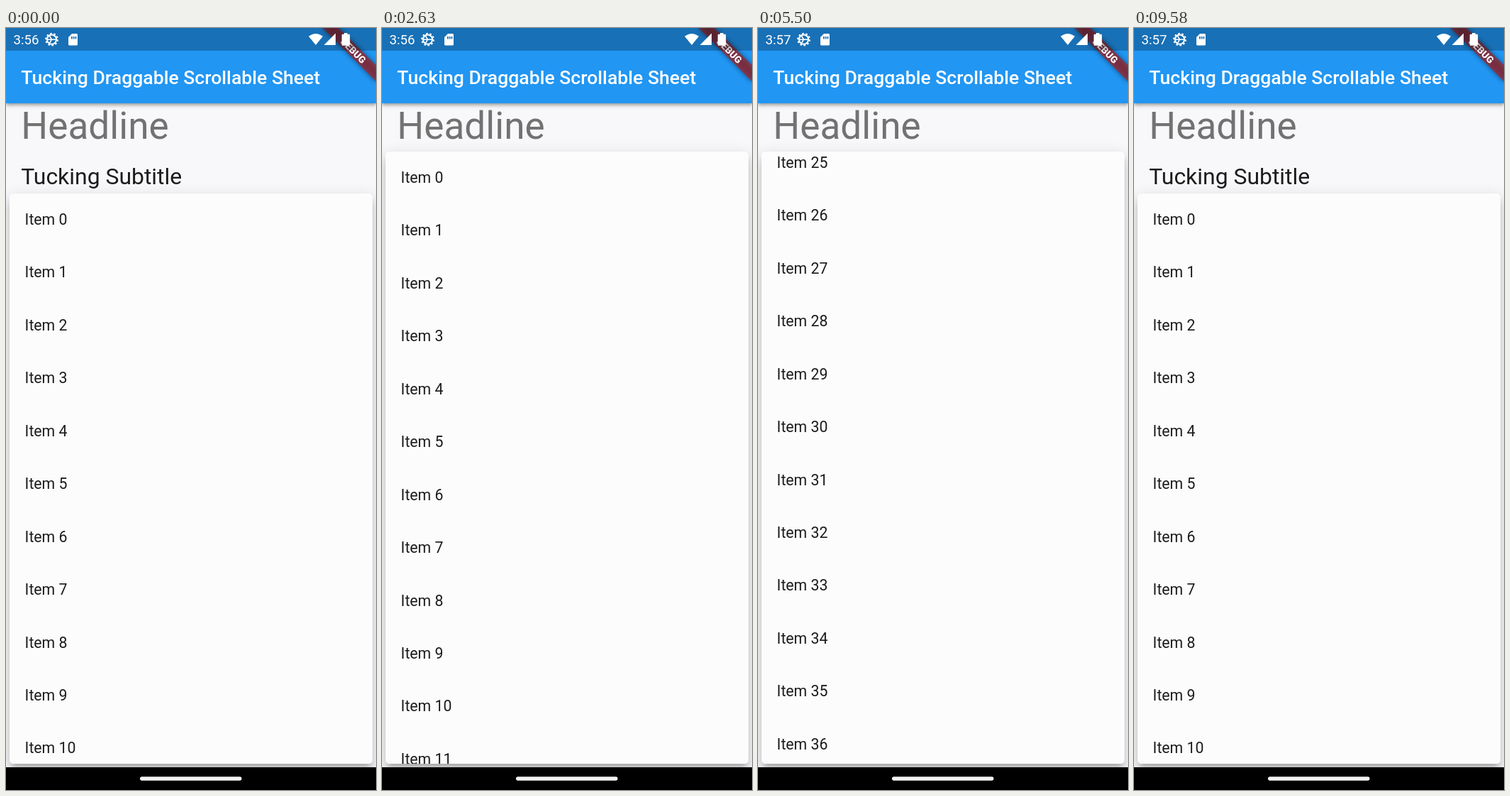
Write an HTML page that moves like this. It is 522 px wide and 1073 px high and loops after 9620 ms.

```html
<!DOCTYPE html>
<html lang="en">
<head>
<meta charset="utf-8">
<title>Tucking sheet</title>
<style>
  html, body { margin: 0; width: 100%; height: 100%; overflow: hidden; background: #f8f8fa; }
  #stage { position: relative; width: 522px; height: 1073px; overflow: hidden; font-family: Roboto, sans-serif; }
  svg { position: absolute; left: 0; top: 0; display: block; }
  #sheet {
    position: absolute; left: 5.3px; right: 5.3px; top: 233px; bottom: 37.4px;
    border-radius: 5.3px; background: #fcfcfd;
    box-shadow: 0 7px 7px -4px rgba(0,0,0,.2), 0 11px 14px 1px rgba(0,0,0,.12), 0 4px 19px 3px rgba(0,0,0,.09);
  }
  #view { position: absolute; inset: 0; overflow: hidden; border-radius: 5.3px; }
  #list div { height: 74.44px; line-height: 74.44px; padding-left: 21.3px; font-size: 21.27px; color: #1c1c1d; white-space: pre; }
  #bar {
    position: absolute; left: 0; top: 0; width: 522px; height: 106.4px; background: #2196f3;
    box-shadow: 0 2px 4px rgba(0,0,0,.28), 0 4px 6px rgba(0,0,0,.14);
  }
  #glow { transform-origin: 0 0; }
</style>
</head>
<body>
<div id="stage">
  <svg width="522" height="1073">
    <text x="21.3" y="156" font-size="53.17" fill="#727273">Headline</text>
    <text x="21.3" y="219.6" font-size="31.9" fill="#1c1c1d">Tucking Subtitle</text>
  </svg>

  <div id="sheet">
    <div id="view">
      <div id="list"></div>
      <svg id="glow" width="512" height="60"><path d="M0 0H512V20.5Q256 50 0 20.5Z" fill="#2196f3" fill-opacity=".125"/></svg>
    </div>
  </div>

  <div id="bar"></div>
  <svg width="522" height="1073">
    <defs>
      <filter id="soft" x="-20%" y="-60%" width="140%" height="220%"><feGaussianBlur stdDeviation="3.5"/></filter>
    </defs>
    <text x="21.3" y="79.4" font-size="26.59" font-weight="500" fill="#fff">Tucking Draggable Scrollable Sheet</text>

    <g transform="translate(522 0) rotate(45)">
      <rect x="-53.2" y="37.2" width="106.4" height="16" fill="#000" opacity=".5" filter="url(#soft)"/>
      <rect x="-53.2" y="37.2" width="106.4" height="16" fill="#b71c1c" fill-opacity=".627"/>
      <text x="0" y="50" font-size="13.56" font-weight="900" fill="#fff" text-anchor="middle">DEBUG</text>
    </g>

    <rect width="522" height="31.9" fill="#000" fill-opacity=".25"/>
    <g fill="#fff">
      <g font-size="18.6">
        <text id="before" x="10.6" y="23">3:56</text>
        <text id="after" x="10.6" y="23">3:57</text>
      </g>
      <g fill="none" stroke="#fff">
        <circle cx="64.5" cy="16.2" r="6.6" stroke-width="2"/>
        <circle cx="64.5" cy="16.2" r="8.4" stroke-width="2" stroke-dasharray="2.6 2.68"/>
        <path d="M58 16.2H71M64.5 16.2L61 10.5M64.5 16.2L61 22" stroke-width="1.6"/>
      </g>
      <path fill-rule="evenodd" d="M93 8H99.5Q101 8 101 9.5V23Q101 24.5 99.5 24.5H89.5Q88 24.5 88 23V13ZM92 12V15.4H93.7V12ZM94.8 12V15.4H96.5V12ZM97.6 12V15.4H99.3V12Z"/>
      <path d="M437 24L427 11.8Q437 4.2 447 11.8Z"/>
      <path d="M465 7.5V24H448.6Z"/>
      <path d="M477 7H481.6V8.8H484Q485.2 8.8 485.2 10V23.5Q485.2 24.8 484 24.8H475Q473.7 24.8 473.7 23.5V10Q473.7 8.8 475 8.8H477Z"/>
    </g>

    <rect y="1041" width="522" height="32" fill="#000"/>
    <rect x="189" y="1054.3" width="143.5" height="5.4" rx="2.7" fill="#f2f2f2"/>
  </svg>
</div>
<script>
  const LOOP = 9620;
  const $ = id => document.getElementById(id);

  for (let i = 0; i < 50; i++) {
    const row = document.createElement('div');
    row.textContent = 'Item ' + i;
    $('list').append(row);
  }

  // Each step: [time in ms, value, easing towards the next step]
  function play(id, prop, format, steps) {
    const frames = steps.map(([t, v, easing = 'linear']) => ({ offset: t / LOOP, [prop]: format(v), easing }));
    $(id).animate(frames, { duration: LOOP, iterations: Infinity });
  }

  const px = v => v + 'px';
  const scroll = v => `translateY(${-v}px)`;
  const number = v => v;
  const fling = 'cubic-bezier(.2,.6,.3,1)';

  play('sheet', 'top', px, [
    [0, 233], [1100, 233, 'ease-in'], [1540, 213], [2400, 174],
    [6640, 174, 'ease-in-out'], [7700, 233], [LOOP, 233]
  ]);
  play('list', 'transform', scroll, [
    [0, 0], [4350, 0, 'ease-in'], [4500, 130, fling], [5500, 1882.5],
    [5620, 1882.5, 'cubic-bezier(.35,.1,.6,1)'], [6270, 0],
    [6330, -1.5], [6640, -1.5, 'ease-out'], [6800, 0], [LOOP, 0]
  ]);
  play('glow', 'opacity', number, [
    [0, 0], [6230, 0], [6310, 1], [6400, 1, 'ease-out'], [6900, 0], [LOOP, 0]
  ]);
  play('glow', 'transform', v => `scaleY(${v})`, [
    [0, 0], [6230, 0], [6330, 1], [6400, 1, 'ease-out'], [6900, 0], [LOOP, 0]
  ]);

  const MINUTE = 2900;
  play('before', 'opacity', number, [[0, 1], [MINUTE, 1], [MINUTE, 0], [LOOP, 0]]);
  play('after', 'opacity', number, [[0, 0], [MINUTE, 0], [MINUTE, 1], [LOOP, 1]]);
</script>
</body>
</html>
```
